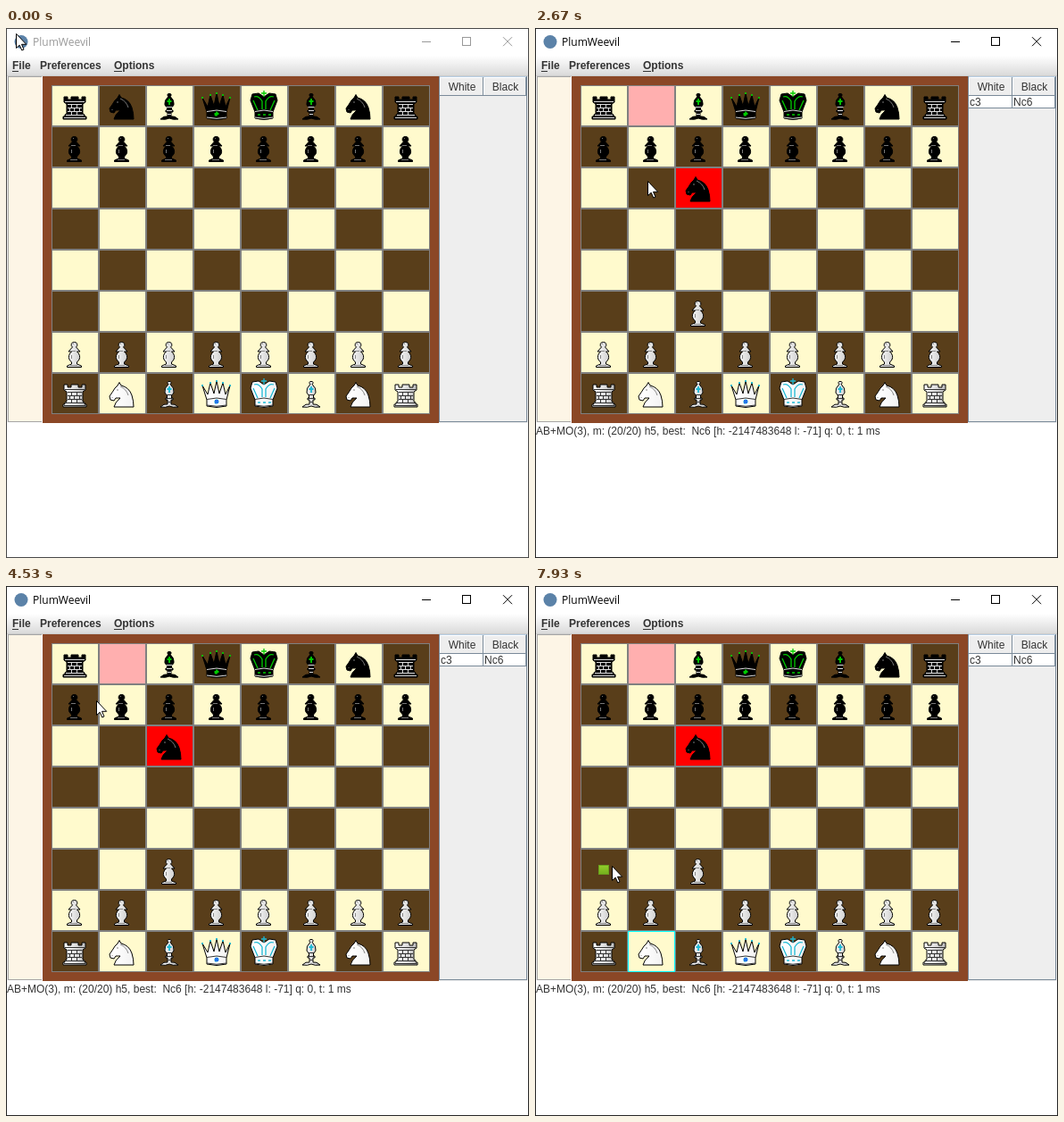
An HTML page with a canvas that plays this animation: 586 by 593 pixels, repeating every 8000 ms.

```html
<!DOCTYPE html>
<html lang="en">
<head>
<meta charset="utf-8">
<title>Chess window</title>
<style>
html, body { margin: 0; width: 100%; height: 100%; overflow: hidden; background: #fff; }
canvas { display: block; width: 586px; height: 593px; }
</style>
</head>
<body>
<canvas id="stage" width="586" height="593"></canvas>
<script>
const g = document.getElementById('stage').getContext('2d');
const LOOP = 8000, TICK = 1000 / 15;
const SANS = '12px "Liberation Sans", Arial, sans-serif';
const BOLD = 'bold ' + SANS;
const LINE = '#7a8a99';

// Moments at which the state switches, in ms
const AT = { focus: 1067, push: 1933, think: 2000, reply: 2133, open: 3467, close: 4533, pick: 7067 };

// Pointer path: time, x, y
const PATH = [
  [0, 11, 6], [867, 175, 362], [1067, 175, 362], [1667, 195, 312],
  [2267, 195, 312], [3067, 56, 30], [3133, 56, 30], [3400, 62, 42],
  [3667, 62, 42], [4200, 101, 128], [4867, 101, 128], [5400, 296, 376],
  [5667, 303, 361], [5733, 303, 361], [5933, 307, 370], [6000, 307, 370],
  [6733, 114, 405], [7067, 114, 405], [7400, 188, 335], [7867, 90, 314], [7933, 86, 313]
];

const MENU = [
  ['Choose Colors', 53, 'sub'], ['Choose Chess Men Image Set', 74, 'sub'], ['Flip board', 95, ''],
  ['Highlight Legal Moves', 123, 'box'], ['Use Book Moves', 144, 'box']
];

const p = d => new Path2D(d);
const ARROW = p('M.5 .5V16.5L4.2 13.2L6.8 19L9 18L6.5 12.3H11.7Z');

// Outlines inside one 53 x 46 tile
const SHAPE = {
  r: p('M14 13h4v3h4v-3h8v3h4v-3h4v6l-3 2v11l2 1v2h2v3h-26v-3h2v-2l2-1v-11l-3-2z'),
  n: p('M23 10.5L25 14Q34 16 37 25Q39 31 39 38H17Q18 33 24 28Q21 28 19 28L17 31L13 30L12 26Q15 22 18 17L21 14Z'),
  b: p('M26 9.5a1.5 1.5 0 0 1 1 3Q32 17 31 22Q30 24 28.5 25V28H30V30H28V35Q32 34 36 38Q30 39 26 37Q22 39 16 38Q20 34 24 35V30H22V28H23.5V25Q22 24 21 22Q20 17 25 12.5A1.5 1.5 0 0 1 26 9.5Z'),
  q: p('M10 14L16 24L19 11L23 23L26 9L29 23L33 11L36 24L41 14L37 30V37Q26 40 15 37V30Z'),
  k: p('M16 30L11 17L13 10L20 9L26 13L32 9L39 10L41 17L36 30V37Q26 40 16 37Z'),
  p: p('M25.5 11.5a3 3 0 0 1 2 5.5L32 22H28.5Q33 26 31 31L28.5 34V36L33.5 38V39.5H17.5V38L22.5 36V34L20 31Q18 26 22.5 22H19L23.5 17A3 3 0 0 1 25.5 11.5Z')
};
const DETAIL = {
  r: p('M15 18.5h22M18 21.5h16M18 25.5h16M18 29.5h16M16 33.5h20M14 36.5h24M22.5 21v4M28.5 21v4M25.5 25v4M31.5 25v4M20.5 25v4M22.5 29v4M28.5 29v4'),
  n: p('M20 19h2M14.5 27l1 1M24 15Q31 18 33 25'),
  b: p('M22.5 24.5h7M23 28.5h6M24 32.5h4'),
  q: p('M15 29.5Q26 26.5 37 29.5M15 36Q26 38.5 37 36'),
  k: p('M16 29.5Q26 26.5 36 29.5M16 36Q26 38.5 36 36'),
  p: p('M24 14l1-1M22 21.5h5M22.5 26v4M21 37.5h8')
};
const GEM = {
  b: p('M26 15v7M23.5 18h5'),
  q: p('M26 29.5v5M23.5 32h5M24 34l4-3M10 13v2M19 10v2M26 8v2M33 10v2M41 13v2'),
  k: p('M26 6v7M23 9h6M15 13Q20 11 24 18V27M37 13Q32 11 28 18V27M14 17L19 28M38 17L33 28M19 33h3M25 33h3M31 33h3')
};

function rect(x, y, w, h, color) {
  g.fillStyle = color;
  g.fillRect(x, y, w, h);
}

function frame(x, y, w, h, color) {
  g.strokeStyle = color;
  g.lineWidth = 1;
  g.strokeRect(x + .5, y + .5, w - 1, h - 1);
}

function text(s, x, y, color = '#333', font = SANS, align = 'left') {
  g.font = font;
  g.textAlign = align;
  g.fillStyle = color;
  g.fillText(s, x, y);
}

function lines(path, color, width = 1) {
  g.strokeStyle = color;
  g.lineWidth = width;
  g.stroke(path);
}

function fade(y0, y1, a, b) {
  const f = g.createLinearGradient(0, y0, 0, y1);
  f.addColorStop(0, a);
  f.addColorStop(1, b);
  return f;
}

function pointer(t) {
  let i = PATH.findIndex(k => k[0] > t);
  if (i < 0) return PATH[PATH.length - 1].slice(1);
  const [t0, x0, y0] = PATH[i - 1], [t1, x1, y1] = PATH[i];
  const u = (t - t0) / (t1 - t0), e = u * u * (3 - 2 * u);
  return [Math.round(x0 + (x1 - x0) * e), Math.round(y0 + (y1 - y0) * e)];
}

function drawPiece(kind, col, row) {
  const black = kind === kind.toLowerCase(), k = kind.toLowerCase();
  g.save();
  g.translate(51 + col * 53, 64 + row * 46);
  if (black) {
    g.fillStyle = '#000';
  } else {
    const shade = g.createLinearGradient(16, 0, 36, 0);
    shade.addColorStop(0, '#fff');
    shade.addColorStop(1, 'nqk'.includes(k) ? '#f4f4f4' : '#c4c4c4');
    g.fillStyle = shade;
  }
  g.fill(SHAPE[k]);
  lines(SHAPE[k], '#000');
  const soft = k === 'n' || k === 'p';
  lines(DETAIL[k], black ? (soft ? '#777' : '#ddd') : (soft ? '#888' : '#333'));
  if (GEM[k]) lines(GEM[k], black ? '#0c0' : '#1cb8d4', k === 'k' ? 1.3 : 1.8);
  if (k === 'q' && !black) rect(24, 30, 4, 4, '#2474e8');
  g.restore();
}

function position(t) {
  const rows = ['rnbqkbnr', 'pppppppp', '', '', '', '', 'PPPPPPPP', 'RNBQKBNR']
    .map(r => r.padEnd(8).split(''));
  const move = (c0, r0, c1, r1) => { rows[r1][c1] = rows[r0][c0]; rows[r0][c0] = ' '; };
  if (t >= AT.push) move(2, 6, 2, 5);
  if (t >= AT.reply) move(1, 0, 2, 2);
  return rows;
}

function drawBoard(t) {
  rect(41, 54, 445, 388, '#8b4726');
  const replied = t >= AT.reply;
  position(t).forEach((cells, r) => cells.forEach((piece, c) => {
    const x = 51 + c * 53, y = 64 + r * 46;
    let color = (r + c) % 2 ? '#593e1a' : '#fffacd';
    if (replied && r === 0 && c === 1) color = '#ffafaf';
    if (replied && r === 2 && c === 2) color = '#f00';
    const chosen = t >= AT.focus && t < AT.push && r === 6 && c === 2 ||
      t >= AT.pick && r === 7 && c === 1;
    rect(x, y, 53, 46, color);
    frame(x, y, 53, 46, chosen ? '#0ff' : '#808080');
    if (piece !== ' ') drawPiece(piece, c, r);
  }));
  if (t >= AT.pick) {
    rect(71, 312, 12, 11, fade(312, 323, '#93cf2c', '#73ae1c'));
    frame(71, 312, 12, 11, '#6a9f1c');
  }
}

function drawWindow(active) {
  rect(0, 0, 586, 593, '#fff');
  g.fillStyle = '#5b82a8';
  g.beginPath();
  g.arc(17, 15.5, 7.5, 0, 7);
  g.fill();
  text('PlumWeevil', 30, 20, active ? '#000' : '#999', '12px "Open Sans", sans-serif');
  const ink = active ? '#000' : '#999';
  rect(466, 15, 10, 1, ink);
  frame(511, 10, 10, 10, ink);
  lines(p('M557 10.2l10 10M567 10.2l-10 10'), ink);

  rect(1, 31, 584, 22, fade(31, 53, '#fff', '#dadada'));
  rect(1, 53, 584, 1, '#ccc');
  rect(1, 54, 40, 388, '#eee');
  rect(3, 55, 37, 386, '#fdf5e6');
  frame(2, 54, 39, 387, '#a5a5a5');
  rect(1, 441, 40, 1, '#fff');
  rect(40, 54, 1, 388, '#fff');
}

function drawMenuBar() {
  text('File', 7, 46, '#333', BOLD);
  rect(7, 48, 7, 1, '#333');
  text('Preferences', 38, 46, '#333', BOLD);
  text('Options', 121, 46, '#333', BOLD);
  rect(121, 48, 9, 1, '#333');
}

function drawMoves(t) {
  rect(485, 54, 100, 388, '#eee');
  frame(485, 54, 99, 387, LINE);
  rect(486, 54, 97, 1, '#b8cfe5');
  [['White', 486, 49, 'c3', AT.push], ['Black', 535, 48, 'Nc6', AT.reply]].forEach(([head, x, w, move, at]) => {
    rect(x, 55, w, 20, '#eee');
    rect(x, 55, w, 1, '#fff');
    rect(x, 55, 1, 20, '#fff');
    rect(x, 75, w, 1, LINE);
    rect(x + w - 1, 55, 1, 21, LINE);
    text(head, x + w / 2 + .5, 70, '#333', SANS, 'center');
    if (t < AT.push) return;
    rect(x, 76, w - 1, 13, '#fff');
    rect(x, 89, w, 1, LINE);
    rect(x + w - 1, 76, 1, 14, LINE);
    if (t >= at) text(move, x + 1, 87);
  });
}

function drawMenu(y) {
  rect(32, 31, 83, 22, '#a3b8cc');
  text('Preferences', 38, 46, '#333', BOLD);
  rect(32, 52, 205, 114, '#eee');
  frame(32, 52, 205, 114, '#a3b8cc');
  rect(33, 119, 203, 1, '#a3b8cc');
  rect(33, 120, 203, 1, '#fff');
  MENU.forEach(([label, top, kind]) => {
    if (y >= top && y < top + 21) rect(33, top, 203, 21, '#a3b8cc');
    text(label, 55, top + 15, '#333', BOLD);
    if (kind === 'box') frame(38, top + 5, 10, 10, LINE);
    if (kind === 'sub') {
      g.fillStyle = '#333';
      g.fill(p(`M227 ${top + 6}l4 4l-4 4z`));
    }
  });
}

function draw(t) {
  const active = t >= AT.focus, [x, y] = pointer(t);
  drawWindow(active);
  drawMenuBar();
  drawBoard(t);
  drawMoves(t);
  if (t >= AT.think) text('AB+MO(3), m: (20/20) h5, best:  Nc6 [h: -2147483648 l: -71] q: 0, t: 1 ms', 1, 455);
  if (t >= AT.open && t < AT.close) drawMenu(y);
  frame(0, 0, 586, 593, active ? '#262626' : '#484848');

  g.save();
  g.translate(x, y);
  g.fillStyle = '#fff';
  g.fill(ARROW);
  lines(ARROW, '#000');
  g.restore();
}

const start = performance.now();
let last = -1;
function loop() {
  const ms = (performance.now() - start) % LOOP;
  const tick = Math.min(119, Math.floor((ms + 4) / TICK));
  if (tick !== last) draw(Math.round(tick * TICK));
  last = tick;
  requestAnimationFrame(loop);
}
loop();
</script>
</body>
</html>
```
